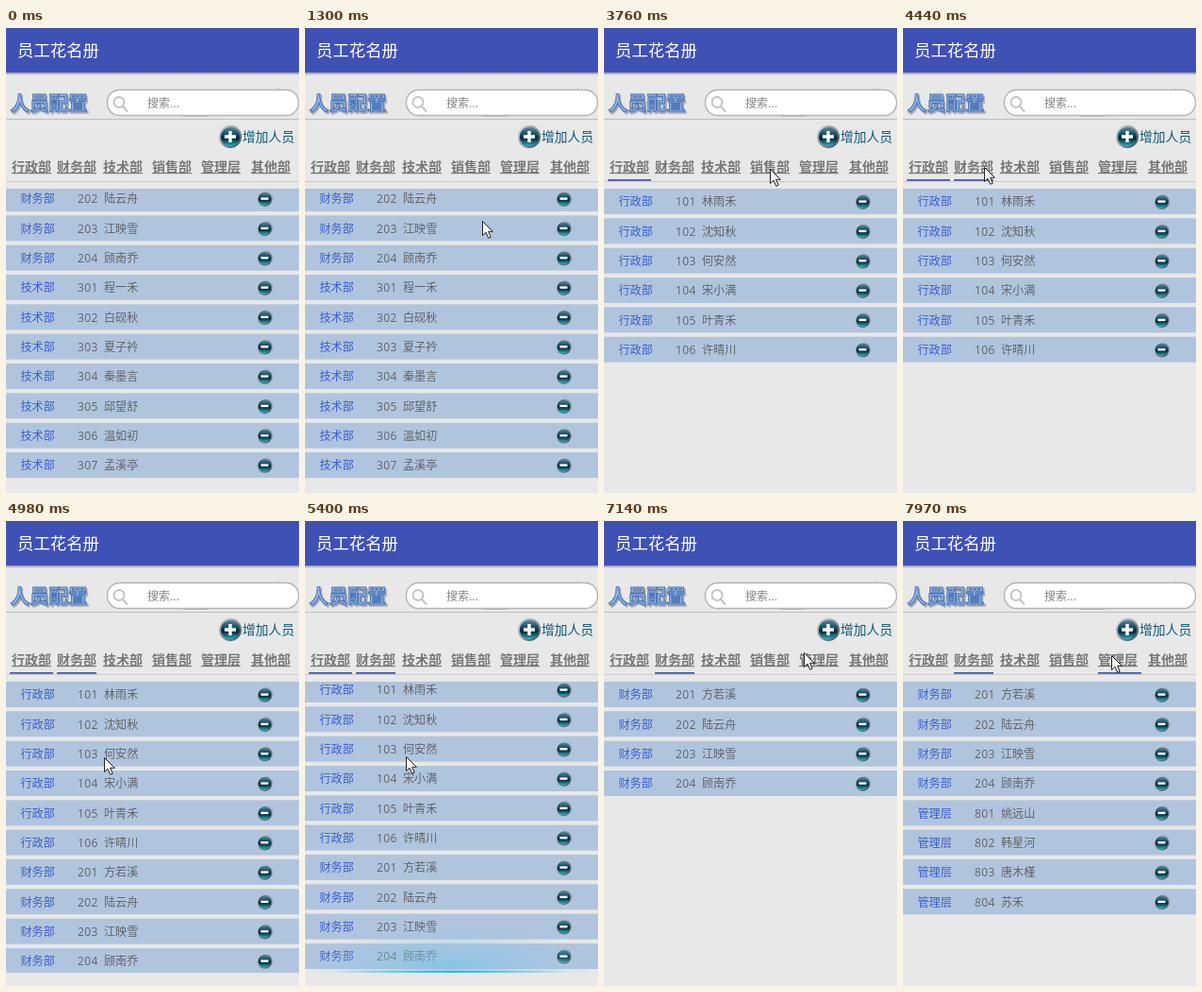
An HTML page for the animation above (8000 ms loop, 311 by 492 pixels).

```html
<!DOCTYPE html>
<html lang="zh-CN">
<head>
<meta charset="utf-8">
<title>员工花名册</title>
<style>
  html, body { margin: 0; width: 100%; height: 100%; overflow: hidden; background: #e8e8e8; }
  svg { display: block; width: 311px; height: 492px; }
  text { font-family: "Noto Sans CJK SC", "Noto Sans CJK", "Noto Sans", sans-serif; }
  .tab { font-size: 14px; font-weight: 700; fill: #777; }
  .dept { font-size: 12.1px; fill: #3a5fcd; }
  .num { font: 12px "Open Sans", "Noto Sans", sans-serif; letter-spacing: .4px; fill: #606468; }
  .name { font-size: 12.1px; fill: #606468; }
  .logo { font-size: 20.5px; font-weight: 700; }
</style>
</head>
<body>
<svg viewBox="0 0 311 492" xmlns="http://www.w3.org/2000/svg">
  <defs>
    <linearGradient id="shade" x2="0" y2="1">
      <stop stop-color="#8d8f9c"/><stop offset="1" stop-color="#e8e8e8"/>
    </linearGradient>
    <linearGradient id="ball" x2="0" y2="1">
      <stop stop-color="#5b8ba0"/><stop offset=".45" stop-color="#0c4058"/>
      <stop offset=".6" stop-color="#042838"/><stop offset="1" stop-color="#2bb3c4"/>
    </linearGradient>
    <linearGradient id="rim" x2="1" y2="1">
      <stop stop-color="#dfe8ec"/><stop offset="1" stop-color="#34454e"/>
    </linearGradient>
    <radialGradient id="halo" cx=".5" cy="1" r="1" gradientTransform="translate(.25 0) scale(.5 1)">
      <stop stop-color="#6cc3e6" stop-opacity=".65"/>
      <stop offset=".6" stop-color="#8cc8e8" stop-opacity=".35"/>
      <stop offset="1" stop-color="#9ccbea" stop-opacity="0"/>
    </radialGradient>
    <linearGradient id="edge">
      <stop stop-color="#35b5d5" stop-opacity="0"/><stop offset=".5" stop-color="#35b5d5"/>
      <stop offset="1" stop-color="#35b5d5" stop-opacity="0"/>
    </linearGradient>
    <clipPath id="view"><rect y="170" width="311" height="308"/></clipPath>
    <g id="orb">
      <circle r="8.2" fill="url(#rim)"/>
      <circle r="6.9" fill="url(#ball)"/>
    </g>
  </defs>

  <rect width="311" height="492" fill="#e8e8e8"/>
  <rect width="311" height="47" fill="#3f51b5"/>
  <rect y="47" width="311" height="3" fill="url(#shade)"/>
  <text x="12" y="30.3" font-size="17.4" fill="#fff">员工花名册</text>

  <text class="logo" x="6" y="88.5" fill="#9a9fa8" stroke="#a9adb5" stroke-width="1.5">人员配置</text>
  <text class="logo" x="4.5" y="87" fill="#93b4e4" stroke="#4a74b4" stroke-width="1">人员配置</text>

  <path d="M0 96.5H311M188 93.5h26M289.500 65v-2" stroke="#bdbdbd"/>
  <rect x="107.500" y="65.500" width="203" height="27" rx="13" fill="#fff" stroke="#b4b4b4" stroke-width="1.4"/>
  <g fill="none" stroke="#c4c4c4" stroke-width="2">
    <circle cx="120" cy="78.500" r="5.500"/><path d="M124 83l4.500 5" stroke-linecap="round"/>
  </g>
  <text x="150" y="83.500" font-size="12" fill="#808080">搜索...</text>

  <use href="#orb" transform="translate(238 115) scale(1.48)"/>
  <path d="M232 115h12M238 109v12" stroke="#fff" stroke-width="3.400"/>
  <text x="251" y="120" font-size="13.800" fill="#0f5878">增加人员</text>

  <g id="tabs"></g>
  <path d="M0 162.500H311" stroke="#cbcbcb"/>
  <g id="marks" fill="#4658b4"></g>
  <g id="lists" clip-path="url(#view)"></g>
  <g id="glow" opacity="0">
    <rect y="424" width="311" height="54" fill="url(#halo)"/>
    <rect x="35" y="476" width="240" height="2" fill="url(#edge)"/>
  </g>
  <g id="cursor" opacity="0">
    <path d="M.5 .5V15.500L4 12.200L6.700 18.300L9.200 17.200L6.600 11.300H11.300Z" fill="#fff" stroke="#222" stroke-linejoin="round"/>
  </g>
</svg>

<script>
const LOOP = 8000, PITCH = 31.33;
const $ = id => document.getElementById(id);

function add(parent, tag, attrs, text = '') {
  const el = document.createElementNS('http://www.w3.org/2000/svg', tag);
  for (const key in attrs) el.setAttribute(key, attrs[key]);
  el.textContent = text;
  return parent.appendChild(el);
}

// Holds each value until the next time in the table.
function hold(el, prop, table) {
  if (table[0][0] > 0) table = [[0, table[0][1]], ...table];
  const frames = table.map(([t, v]) => ({ offset: t / LOOP, [prop]: v, easing: 'step-end' }));
  frames.push({ offset: 1, [prop]: table[table.length - 1][1] });
  el.animate(frames, { duration: LOOP, iterations: Infinity });
}
const move = (x, y) => `translate(${x}px, ${y}px)`;
const during = (el, from, to) =>
  hold(el, 'opacity', [...(from ? [[0, 0]] : []), [from, 1], ...(to < LOOP ? [[to, 0]] : [])]);

// Department tabs
const tabX = { 行政部: 6, 财务部: 54, 技术部: 103, 销售部: 155, 管理层: 207, 其他部: 260 };
for (const [label, x] of Object.entries(tabX)) {
  add($('tabs'), 'text', { class: 'tab', x, y: 152 }, label);
  add($('tabs'), 'rect', { x, y: 153, width: 42, height: 1.2, fill: '#777' });
}
[[4, 46, 2260, 6540], [54, 42, 4440, LOOP], [207, 46, 7560, LOOP]].forEach(([x, width, from, to]) =>
  during(add($('marks'), 'rect', { x, y: 160, width, height: 1.8 }), from, to));

// Staff lists
const staff = (dept, first, names) => names.split(' ').map((name, i) => [dept, first + i, name]);
const admin = staff('行政部', 101, '林雨禾 沈知秋 何安然 宋小满 叶青禾 许晴川');
const finance = staff('财务部', 201, '方若溪 陆云舟 江映雪 顾南乔');
const tech = staff('技术部', 301, '程一禾 白砚秋 夏子衿 秦墨言 邱望舒 温如初 孟溪亭');
const managers = staff('管理层', 801, '姚远山 韩星河 唐木槿 苏禾');

function list(rows, from, to) {
  const group = add($('lists'), 'g', {});
  rows.forEach(([dept, num, name], i) => {
    const row = add(group, 'g', { transform: `translate(0 ${170 + i * PITCH})` });
    add(row, 'rect', { width: 311, height: 27, fill: '#b0c4de' });
    add(row, 'text', { class: 'dept', x: 15.5, y: 18.4 }, dept);
    add(row, 'text', { class: 'num', x: 76, y: 18.4 }, num);
    add(row, 'text', { class: 'name', x: 104, y: 18.4 }, name);
    add(row, 'use', { href: '#orb', x: 274.5, y: 13.7 });
    add(row, 'rect', { x: 270.5, y: 12.4, width: 8, height: 2.4, fill: '#fff' });
  });
  during(group, from, to);
  return group;
}
hold(list([...finance.slice(1), ...tech], 0, 2400), 'transform', [[0, move(0, -3)]]);
list(admin, 2400, 4560);
hold(list([...admin, ...finance], 4560, 6690), 'transform',
  [[0, move(0, 0)], [5260, move(0, -5)]]);
list(finance, 6690, 7690);
list([...finance, ...managers], 7690, LOOP);

// Overscroll glow and pointer
hold($('glow'), 'opacity', [[0, 0], [5260, .4], [5400, 1], [5550, .7], [5700, .3], [5850, 0]]);
during($('cursor'), 1300, LOOP);
hold($('cursor'), 'transform', [
  [1300, 188, 204], [1420, 178, 200], [1560, 146, 187], [1700, 105, 172],
  [1840, 68, 159], [1980, 45, 151], [2120, 36, 148],
  [2810, 58, 148], [2950, 130, 149], [3080, 181, 149],
  [3760, 176, 149], [3900, 152, 148], [4030, 122, 148], [4160, 98, 147], [4300, 86, 147],
  [4830, 91, 172], [4980, 104, 250], [5110, 110, 304], [5260, 109, 286], [5400, 107, 249],
  [5550, 105, 224], [5700, 103, 216], [5850, 100, 213],
  [5970, 84, 196], [6110, 54, 170], [6260, 32, 152], [6400, 25, 147],
  [6840, 112, 143], [6990, 202, 138], [7140, 212, 139], [7260, 219, 140], [7970, 221, 142]
].map(([t, x, y]) => [t, move(x, y)]));
</script>
</body>
</html>
```
